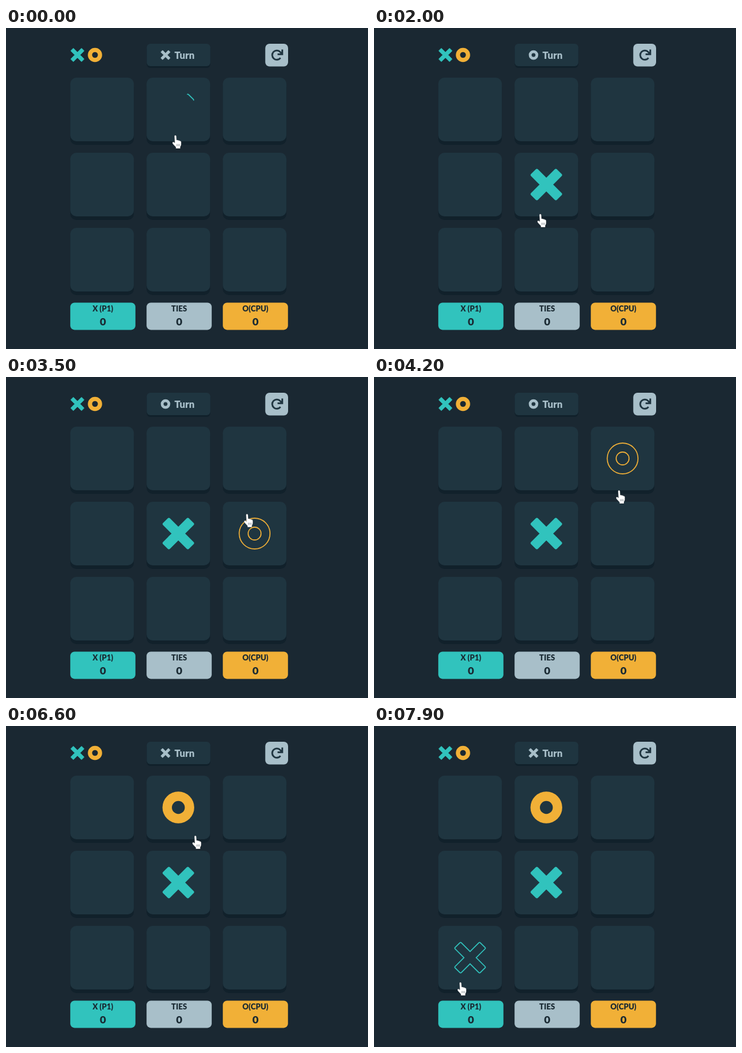
Recreate the animation shown at these times as an HTML page. Size 598 by 530 pixels, loop 8 s.

```html
<!DOCTYPE html>
<html lang="en">
<head>
<meta charset="utf-8">
<title>Noughts and crosses</title>
<style>
  html, body { margin: 0; width: 100%; height: 100%; overflow: hidden; background: #1a2832; }
  svg { display: block; width: 598px; height: 530px; }
  text { font-family: Lato, "Open Sans", sans-serif; font-weight: 900; }
  .label { font-size: 12.6px; text-anchor: middle; }
  .score { font-size: 17.6px; text-anchor: middle; }
</style>
</head>
<body>
<svg id="stage" viewBox="0 0 598 530"></svg>
<script>
const LOOP = 8000, STEP = 100;
const TEAL = '#31c3bd', AMBER = '#f1b037', SILVER = '#a8bfc9';
const NAVY = '#1a2a33', TILE = '#1f3540', SHADE = '#11212b';
const PITCH_X = 126, PITCH_Y = 124, TILE_SIZE = 105, LIP = 6;
const MARK_SCALE = 0.82;
const DRAW_RATE = 0.65; // outline units per ms

// One arm with two rounded corners, repeated in four quarter turns.
function cross(near = 19.1, far = 31.5, r = 1.4) {
  let d = '';
  for (let k = 0; k < 4; k++) {
    const c = Math.round(Math.cos(k * Math.PI / 2)), s = Math.round(Math.sin(k * Math.PI / 2));
    const p = (x, y) => `${x * c - y * s} ${x * s + y * c} `;
    d += (k ? 'L' : 'M') + p(near - r, r - far) + 'Q' + p(near, -far) + p(near + r, r - far) +
      'L' + p(far - r, -near - r) + 'Q' + p(far, -near) + p(far - r, r - near) +
      'L' + p(far - near, 0);
  }
  return d + 'Z';
}
const circle = r => `M0 ${-r}a${r} ${r} 0 0 1 0 ${2 * r}a${r} ${r} 0 0 1 0 ${-2 * r}`;
const ring = r => circle(r) + circle(13);

const SHAPES = {
  X: { line: cross(), fill: cross(), edge: 2, color: TEAL },
  O: { line: ring(31), fill: ring(32), edge: 0, color: AMBER }
};

const rect = (x, y, w, h, r, fill) =>
  `<rect x="${x}" y="${y}" width="${w}" height="${h}" rx="${r}" fill="${fill}"/>`;
const place = (x, y, s) => `translate(${x} ${y}) scale(${s})`;
const icon = (kind, x, y, s, color = SHAPES[kind].color, id = '') =>
  `<path id="${id}" d="${SHAPES[kind].fill}" fill="${color}" fill-rule="evenodd" stroke="${color}" ` +
  `stroke-width="${SHAPES[kind].edge}" transform="${place(x, y, s)}"/>`;
const raised = (x, y, w, h, r, lip) =>
  rect(x, y + lip, w, h, r, SHADE) + rect(x, y, w, h, r, TILE);

const tileAt = cell => [106.2 + PITCH_X * (cell % 3), 82 + PITCH_Y * Math.floor(cell / 3)];
const markPlace = cell => {
  const [x, y] = tileAt(cell);
  return [x + TILE_SIZE / 2, y + TILE_SIZE / 2, MARK_SCALE];
};

function board() {
  let s = '';
  for (let cell = 0; cell < 9; cell++) s += raised(...tileAt(cell), TILE_SIZE, TILE_SIZE, 10, LIP);
  return s;
}

function header() {
  return icon('X', 118, 44.5, 0.355) + icon('O', 147, 44.5, 0.368) +
    raised(232.5, 26, TILE_SIZE, 37, 6, 3) +
    icon('X', 263.5, 44.6, 0.25, SILVER, 'turnX') + icon('O', 263.5, 44.6, 0.245, SILVER, 'turnO') +
    `<text x="278.3" y="50.5" font-size="16.2" fill="${SILVER}">Turn</text>` +
    rect(428.3, 26, 37.7, 37.5, 7, SILVER) +
    `<g fill="none" stroke="${TILE}" stroke-width="2.8">` +
    '<path d="M453.4 49.3A7.6 7.6 0 1 1 453 39.6L455.5 42.3"/><path d="M456.4 35.6V43.4H448.6"/></g>';
}

function scores() {
  return [['X (P1)', TEAL], ['TIES', SILVER], ['O(CPU)', AMBER]].map(([name, color], i) => {
    const x = 106.2 + PITCH_X * i, mid = x + 53.8;
    return rect(x, 453.4, 107.6, 45, 7, color) +
      `<g fill="${NAVY}"><text class="label" x="${mid}" y="467.5">${name}</text>` +
      `<text class="score" x="${mid}" y="491">0</text></g>`;
  }).join('');
}

const moves = [{ kind: 'X', cell: 4, at: 1700 }, { kind: 'O', cell: 1, at: 5700 }];

// Pointer glides: start, end, x, y
const origin = [275, 177];
const glides = [
  [700, 1500, 270, 307],
  [2200, 3200, 383, 287],
  [3200, 4000, 400, 187],
  [4200, 4900, 311, 181],
  [6500, 6600, 308, 181],
  [6600, 7400, 150, 425],
  [7500, 7900, 138, 423]
];
const easeOut = u => 1 - (1 - u) ** 2;

function pointerAt(t) {
  let [x, y] = origin;
  for (const [from, to, tx, ty] of glides) {
    const k = easeOut(Math.min(1, Math.max(0, (t - from) / (to - from))));
    x += (tx - x) * k;
    y += (ty - y) * k;
  }
  return [x, y];
}

// Cell under the fingertip, or -1 between tiles
function cellAt(t) {
  const [px, py] = pointerAt(t);
  for (let cell = 0; cell < 9; cell++) {
    const [x, y] = tileAt(cell), dx = px + 5 - x, dy = py - y;
    if (dx >= 0 && dx <= TILE_SIZE && dy >= 0 && dy <= TILE_SIZE + LIP) return cell;
  }
  return -1;
}

// How long the pointer has been over the cell; the first visit began 30 ms before the loop.
function dwell(t, cell) {
  let s = t;
  while (s > -30 && t - s < 500 && cellAt(s) === cell) s -= 5;
  return t - s;
}

const hand = 'M3.1 1.9Q3.1 0 4.7 0T6.5 1.8L6.9 8Q8.6 7.2 9.4 8.5 11 8 11.9 9.3' +
  ' 14.3 9 14.5 11.3V15.2Q14.3 17.6 13 19.2V22H5.5V19.8L.6 14.4Q-.9 12.4 .4 11.2 1.9 10.4 3.8 12.4Z';

const stage = document.getElementById('stage');
stage.innerHTML = rect(0, 0, 598, 530, 0, '#1a2832') + header() + board() + scores() +
  '<path id="outline" fill="none" stroke-width="2"/>' +
  moves.map((m, i) => icon(m.kind, ...markPlace(m.cell), undefined, 'mark' + i)).join('') +
  `<g id="hand"><path d="${hand}" fill="#fff" stroke="#0c151b" stroke-width=".35"/>` +
  '<path d="M7.2 14.5V18M9.4 14.5V18M11.6 14.5V18" stroke="#4a555c" stroke-width=".6"/></g>';

const get = id => document.getElementById(id);
const set = (el, attrs) => Object.entries(attrs).forEach(([k, v]) => el.setAttribute(k, v));
const show = (el, on) => set(el, { visibility: on ? 'visible' : 'hidden' });

function render(t) {
  const played = moves.filter(m => t >= m.at);
  const turn = played.length % 2 ? 'O' : 'X';
  const cell = cellAt(t);
  const free = cell >= 0 && !played.some(m => m.cell === cell);

  moves.forEach((m, i) => show(get('mark' + i), t >= m.at));
  show(get('turnX'), turn === 'X');
  show(get('turnO'), turn === 'O');
  show(get('outline'), free);
  if (free) set(get('outline'), {
    d: SHAPES[turn].line,
    stroke: SHAPES[turn].color,
    transform: place(...markPlace(cell)),
    'stroke-dasharray': `${dwell(t, cell) * DRAW_RATE} 999`
  });
  set(get('hand'), { transform: `translate(${pointerAt(t)})` });
}

const start = performance.now();
let last = -1;
function tick() {
  const t = Math.floor((performance.now() - start) % LOOP / STEP) * STEP;
  if (t !== last) render(last = t);
  requestAnimationFrame(tick);
}
tick();
</script>
</body>
</html>
```
